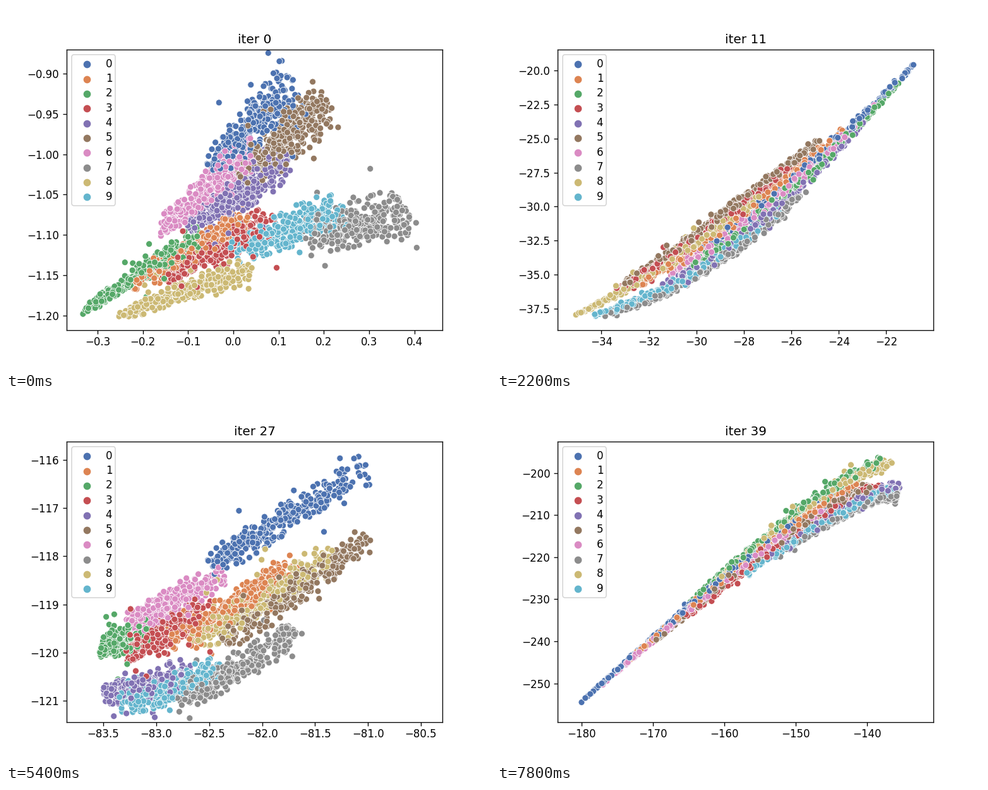
These frames come from a looping animation (768x576 px, 8 s). A matplotlib script:

```python
import numpy as np
import matplotlib.pyplot as plt
from matplotlib.animation import FuncAnimation

PALETTE = ["#4C72B0", "#DD8452", "#55A868", "#C44E52", "#8172B3",
           "#937860", "#DA8BC3", "#8C8C8C", "#CCB974", "#64B5CD"]
PER_CLASS = 320
FRAMES = 40
AXES_ORIGIN, AXES_SIZE = (96, 512.64), (595.2, -443.52)

# A cloud hangs on a spine of three knots (x, y, half width), in pixels.
# "along" ranks the classes from start to end, "across" from top to bottom;
# "span" is the share of the spine that one class covers.
CLOUDS = {
    0: dict(xlim=(-0.3683, 0.462), ylim=(-1.2181, -0.8703), span=0.38,
            spine=[(122, 488, 26), (372, 332, 88), (580, 212, 168)],
            along="2813649057", across="0654213978"),
    4: dict(xlim=(-9.255, -7.174), ylim=(-4.9006, -3.4425), span=0.5,
            spine=[(123, 492, 3), (425, 235, 46), (655, 128, 20)],
            along="8537914206", across="0652381974"),
    11: dict(xlim=(-35.849, -20.012), ylim=(-39.06, -18.473), span=0.6,
             spine=[(123, 492, 4), (370, 356, 28), (664, 89, 3)],
             along="8973514620", across="5381062497"),
    22: dict(xlim=(-86.98, -75.434), ylim=(-143.23, -108.765), span=0.6,
             spine=[(124, 491, 3), (270, 407, 7), (660, 92, 11)],
             along="0835612947", across="4938567120"),
    27: dict(xlim=(-83.846, -80.296), ylim=(-121.441, -115.62), span=0.38,
             spine=[(140, 428, 58), (300, 374, 80), (615, 160, 70)],
             along="2493671850", across="0623185497"),
    35: dict(xlim=(-146.46, -100.68), ylim=(-224.95, -157.58), span=0.85,
             spine=[(124, 491, 4), (372, 286, 7), (664, 89, 4)],
             along="6830152497", across="6247951380"),
    39: dict(xlim=(-183.363, -130.69), ylim=(-259.17, -192.58), span=0.6,
             spine=[(124, 492, 3), (490, 195, 20), (650, 132, 32)],
             along="0615328947", across="2801653497"),
}

# Each point keeps its class and its place within the class
rng = np.random.default_rng(7)
total = PER_CLASS * len(PALETTE)
labels = rng.permutation(np.repeat(np.arange(len(PALETTE)), PER_CLASS))
drift = rng.beta(1.5, 1.5, total) - 0.5
spread = 0.27 * np.clip(rng.normal(0, 0.5, total), -1, 1)
spread[rng.random(total) < 0.04] *= 3


def ranks(order):
    """Rank of every point's class, from 0 to 1."""
    return np.array([order.index(str(k)) for k in range(10)])[labels] / 9


def place(spine, span, along, across, **_):
    """Point positions in axes fractions."""
    a, m, b = np.array(spine, float)
    c = 2 * m - (a + b) / 2
    t = (span / 2 + (1 - span) * ranks(along) + span * drift)[:, None]
    x, y, half = ((1 - t) ** 2 * a + 2 * t * (1 - t) * c + t ** 2 * b).T
    dx, dy, _ = ((1 - t) * (c - a) + t * (b - c)).T
    shift = half * (2 * ranks(across) - 1 + spread) / np.hypot(dx, dy)
    points = np.column_stack([x - dy * shift, y + dx * shift])
    return (points - AXES_ORIGIN) / AXES_SIZE


keys = sorted(CLOUDS)
offsets = [place(**CLOUDS[k]) for k in keys]
xlims = [CLOUDS[k]["xlim"] for k in keys]
ylims = [CLOUDS[k]["ylim"] for k in keys]


def blend(values, i):
    """Linear mix of the two key states around iteration i."""
    n = min(np.searchsorted(keys, i, side="right"), len(keys) - 1)
    t = (i - keys[n - 1]) / (keys[n] - keys[n - 1])
    return (1 - t) * np.asarray(values[n - 1]) + t * np.asarray(values[n])


plt.rcParams["xtick.major.pad"] = 2.7
fig, ax = plt.subplots(figsize=(6.4, 4.8), dpi=120)
dots = ax.scatter(*offsets[0].T, s=36, c=[PALETTE[k] for k in labels],
                  edgecolors="white", linewidths=0.48, transform=ax.transAxes)
for k, color in enumerate(PALETTE):
    ax.scatter([], [], color=color, label=str(k))
ax.legend(loc="upper left", labelspacing=0.32, borderpad=0.31,
          handlelength=2.18, handletextpad=0.71)


def update(i):
    ax.set_xlim(*blend(xlims, i))
    ax.set_ylim(*blend(ylims, i))
    dots.set_offsets(blend(offsets, i))
    ax.set_title(f"iter {i}")
    return dots,


anim = FuncAnimation(fig, update, frames=FRAMES, interval=200, repeat=True)
plt.show()
```
